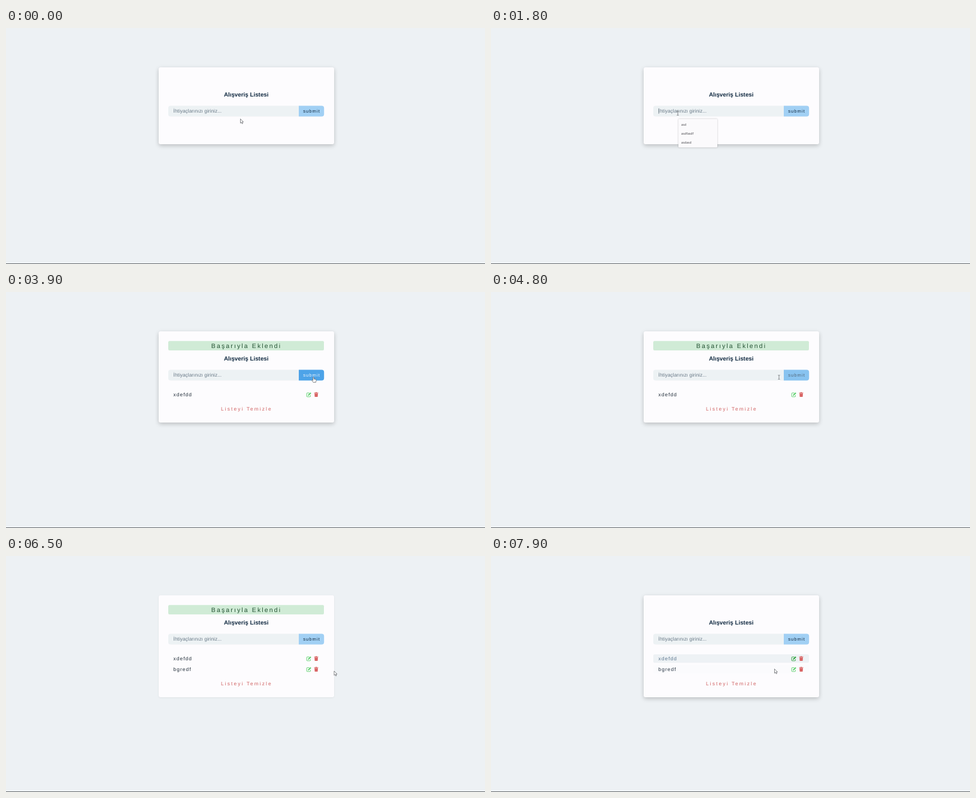
Write an HTML page that moves like this. It is 800x396 px and loops after 8000 ms.

```html
<!DOCTYPE html>
<html lang="tr">
<head>
<meta charset="utf-8">
<title>Alışveriş Listesi</title>
<style>
  html, body { margin: 0; width: 100%; height: 100%; overflow: hidden; background: #edf1f4; }
  #card { position: absolute; left: 254.5px; top: 65.6px; width: 293.3px; border-radius: 3px; background: #fdfcfe; }
  svg { position: absolute; left: 0; top: 0; }
  text { font: 8.38px "Liberation Sans", Arial, sans-serif; white-space: pre; text-rendering: geometricPrecision; }
  #title { font-size: 9.8px; font-weight: bold; fill: #122b42; }
  #notice text { font-size: 10.47px; letter-spacing: 2.15px; fill: #235232; }
  #label { font-size: 7.6px; letter-spacing: 1.05px; }
  #clear { letter-spacing: 2.1px; fill: #d06262; }
  .item text { letter-spacing: 1.05px; }
  #hints text { font: 5.2px "Open Sans", sans-serif; fill: #3c3c42; }
  #hints rect { fill: #fbfafc; filter: drop-shadow(0 .6px 1px rgba(0, 0, 0, .25)); }
  .cursor { fill: #fff; stroke: #54575b; stroke-width: .7; stroke-linejoin: round; }
</style>
</head>
<body>
<div id="card"></div>
<svg width="800" height="396" viewBox="0 0 800 396">
  <defs>
    <g id="pencil">
      <path d="M5 1.2H1.5Q.6 1.2.6 2.1V6.8Q.6 7.6 1.5 7.6H6Q6.9 7.6 6.9 6.8V5" fill="none" stroke="currentColor" stroke-width=".9"/>
      <path d="M2.6 5.8L2.9 4.2 6.8.3 8.2 1.7 4.3 5.6Z" fill="currentColor"/>
    </g>
    <path id="bin" d="M0 .8H2L2.5 0H4.3L4.8.8H6.8V1.7H0ZM.5 2.2H6.3L5.9 7.4Q5.8 8.1 5.2 8.1H1.6Q1 8.1.9 7.4Z" fill="currentColor"/>
  </defs>
  <rect y="395" width="800" height="1" fill="#64676a"/>
  <g id="notice">
    <rect x="271" y="82.3" width="260" height="15.6" rx="2" fill="#d0ebd6"/>
    <text x="342.8" y="93.8">Başarıyla Eklendi</text>
  </g>
  <text id="title" x="401.2" y="115.3" text-anchor="middle">Alışveriş Listesi</text>
  <path d="M489 130.5H275Q271 130.5 271 134.5V144.5Q271 148.5 275 148.5H489Z" fill="#edf2f4"/>
  <path id="submit" d="M489 130.5H527.2Q531.2 130.5 531.2 134.5V144.5Q531.2 148.5 527.2 148.5H489Z"/>
  <text id="field" x="279.6" y="142.3"></text>
  <rect id="caret" y="135" width=".7" height="9" fill="#5a6875"/>
  <text id="label" x="496.2" y="142">submit</text>
  <g id="rows"></g>
  <text id="clear" x="359">Listeyi Temizle</text>
  <g id="hints">
    <rect x="313" y="152.5" width="65" height="48" rx="1.5"/>
    <text x="317.7" y="163.5">asd</text>
    <text x="317.7" y="178.5">asdfasdf</text>
    <text x="317.7" y="193.5">asdasd</text>
  </g>
  <path id="arrow" class="cursor" d="M0 0V7.2L1.7 5.7 2.8 8.2 4 7.7 2.9 5.2H5Z"/>
  <path id="beam" class="cursor" style="fill:none" d="M-1.6 -3.4H-.5L0 -3 .5 -3.4H1.6M0 -3V3M-1.6 3.4H-.5L0 3 .5 3.4H1.6"/>
  <path id="hand" class="cursor" d="M-.8 0Q0 -.8.8 0V3L4 3.7Q4.8 4 4.6 5L3.9 8.6H-.4L-2.8 5.4Q-2.8 4.4 -1.9 4.6L-.8 5.6Z"/>
</svg>
<script>
const $ = id => document.getElementById(id);
const LOOP = 8000, STEP = 100;

// Pointer path: time, x, y
const path = [
  [0, 391.5, 152.5], [100, 430, 165], [350, 661, 258], [550, 470, 205], [800, 260, 118],
  [900, 281, 98], [1300, 312, 143], [3100, 312, 143], [3600, 513.5, 143], [4400, 513.5, 143],
  [4800, 481, 143], [5900, 481, 143], [6250, 548, 193], [6650, 548, 193],
  [7000, 530, 186], [7400, 506, 172], [7870, 504, 173], [7900, 473.5, 189.5]
];
const words = [
  { text: "xdefdd", keys: [2400, 2600, 2800, 2900, 3000, 3100], focus: 1500, sent: 3800 },
  { text: "bgredf", keys: [5300, 5400, 5500, 5600, 5700, 5800], focus: 5000, sent: 6200 }
];
const NOTICE = 1100;

const card = [254.5, 65.6, 547.5, 237], input = [271, 130, 489, 148.5], button = [489, 130, 531, 148.5];
const rowY = i => 165 + 18 * i;

words.forEach((w, i) => {
  const y = rowY(i);
  $("rows").insertAdjacentHTML("beforeend", `<g class="item" id="row${i}">
    <rect x="271" y="${y}" width="260" height="14.2" rx="2.5" fill="#edf1f4"/>
    <text x="279.6" y="${y + 10}">${w.text}</text>
    <use class="edit" href="#pencil" x="501.6" y="${y + 3.2}"/>
    <use href="#bin" x="514.7" y="${y + 3}" color="#d96464"/></g>`);
});

function pointer(t) {
  const i = path.findIndex(p => p[0] > t);
  if (i < 0) return path.at(-1).slice(1);
  if (!i) return path[0].slice(1);
  const [a, x, y] = path[i - 1], [b, u, v] = path[i];
  const k = (t - a) / (b - a), e = k * k * (3 - 2 * k);
  return [x + (u - x) * e, y + (v - y) * e];
}
const inside = ([x, y], [l, t, r, b]) => x >= l && x < r && y >= t && y < b;

// Share of the last 200 ms spent over a box, which gives a linear hover fade
function hover(t, box) {
  let n = 0;
  for (let i = 0; i < 10; i++) n += inside(pointer(t - i * 20), box);
  return n / 10;
}
const mix = (a, b, k) => `rgb(${a.map((v, i) => v + (b[i] - v) * k)})`;
const show = (el, on) => el.style.display = on ? "" : "none";

function draw(t) {
  const count = words.filter(w => t >= w.sent).length;
  const p = pointer(t);
  $("card").style.height = (count ? 135.4 + 18 * count : 129) + "px";
  const lift = hover(t, card);
  $("card").style.boxShadow = `0 ${.8 + 1.8 * lift}px ${3 + 4.9 * lift}px rgba(0,0,0,${.07 + .14 * lift})`;
  show($("notice"), words.some(w => t >= w.sent && t < w.sent + NOTICE));

  const active = words.find(w => t >= w.focus && t < w.sent);
  const typed = active ? active.text.slice(0, active.keys.filter(k => k <= t).length) : "";
  const field = $("field");
  field.textContent = typed || "İhtiyaçlarınızı giriniz...";
  field.style.fill = typed ? "#667f98" : "#6c7c8a";
  const last = active && Math.max(active.focus, ...active.keys.filter(k => k <= t));
  show($("caret"), active && (t - last) % 1000 < 500);
  $("caret").setAttribute("x", 279.8 + (typed ? field.getComputedTextLength() : 0));
  show($("hints"), t >= 1500 && t < 2400);

  const press = hover(t, button);
  $("submit").style.fill = mix([161, 208, 244], [77, 163, 232], press);
  $("label").style.fill = mix([18, 43, 66], [235, 245, 253], press);

  let overIcon = false;
  words.forEach((w, i) => {
    const row = $("row" + i), y = rowY(i), edit = [501, y + 2, 511, y + 12];
    const lit = hover(t, [271, y, 531, y + 14.2]);
    show(row, i < count);
    row.querySelector("rect").style.opacity = lit;
    row.querySelector("text").style.fill = mix([30, 42, 54], [97, 125, 152], lit);
    row.querySelector(".edit").style.color = mix([88, 207, 104], [30, 150, 45], hover(t, edit));
    overIcon ||= i < count && inside(p, edit);
  });
  show($("clear"), count);
  $("clear").setAttribute("y", 180.5 + 18 * count);

  const kind = inside(p, input) ? "beam" : overIcon || inside(p, button) ? "hand" : "arrow";
  for (const id of ["arrow", "beam", "hand"]) {
    show($(id), id === kind);
    $(id).setAttribute("transform", `translate(${p})`);
  }
}

function tick() {
  draw(Math.floor(performance.now() % LOOP / STEP) * STEP);
  requestAnimationFrame(tick);
}
tick();
</script>
</body>
</html>
```
